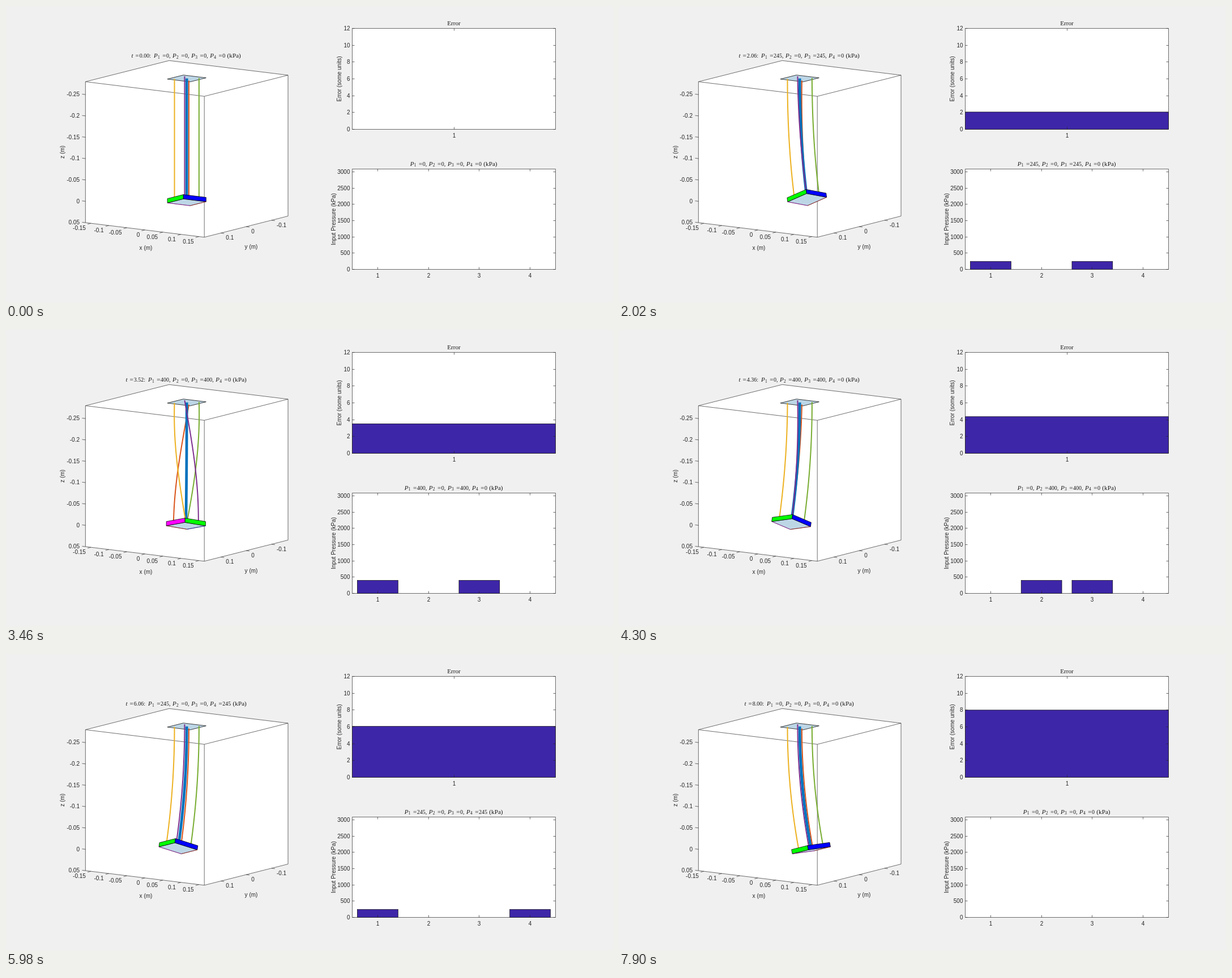
Write an HTML page that moves like this. It is 1072x522 px and loops after 8000 ms.

```html
<!DOCTYPE html>
<html lang="en">
<head>
<meta charset="utf-8">
<title>Soft arm simulation</title>
<style>
html, body { margin: 0; width: 100%; height: 100%; overflow: hidden; background: #f0f0f0; }
svg { display: block; width: 1072px; height: 522px; }
text { font: 10px "Liberation Sans", Arial, sans-serif; fill: #262626; }
.math, .math tspan { font-family: "Liberation Serif", "Times New Roman", serif; fill: #1a1a1a; }
.math { font-size: 10px; }
.word { font-size: 11.2px; }
.var { font-size: 11px; font-style: italic; }
.sub { font-size: 7.5px; }
.axis { fill: none; stroke: #262626; stroke-width: .67; }
.bar { fill: #3e26a8; stroke: #000; stroke-width: .67; }
.arm { fill: none; stroke-width: 2; }
.plate { fill: #bdd6e6; stroke: #000; stroke-width: .75; stroke-linejoin: round; }
</style>
</head>
<body>
<svg viewBox="0 0 1072 522">
  <g id="back"></g>
  <g id="bars"></g>
  <g id="axes"></g>
  <g id="scene"></g>
</svg>
<script>
const $ = id => document.getElementById(id);
const FRAMES = 66, END = 8, LOOP = 8000;
const PMAX = 400, LENGTH = 0.28, HALF = 0.0315, ARM = 0.02, THICK = 0.01;
const VIEW = [-0.557, -0.811, 0.18];

// Per 2 s phase: active muscles, and the bend x, bend y, twist, shortening they settle at
const PHASES = [
  { on: [2, 3], goal: [0.27, 0, 0, 0.0012] },
  { on: [0, 2], goal: [-0.016, 0, 1.69, 0.0012] },
  { on: [1, 2], goal: [0, -0.262, 0, 0.0012] },
  { on: [0, 3], goal: [0, 0.262, 0, 0.0012] }
];
const LAG = [0.3, 0.3, 0.2, 0.2];

const phaseAt = t => PHASES[Math.min(3, Math.floor(t / 2))];
const drive = t => Math.tanh(7.5 * Math.abs(Math.sin(Math.PI * t / 2)));

// First-order response, one state per millisecond
const states = [[0, 0, 0, 0]];
for (let ms = 0; ms < END * 1000; ms++) {
  const t = (ms + 0.5) / 1000, { goal } = phaseAt(t), d = drive(t);
  states.push(states[ms].map((q, k) => q + (goal[k] * d - q) * 0.001 / LAG[k]));
}

// ---- vectors and projection
const add = (a, b) => a.map((v, i) => v + b[i]);
const mul = (a, k) => a.map(v => v * k);
const dot = (a, b) => a[0] * b[0] + a[1] * b[1] + a[2] * b[2];
const cross = (a, b) => [
  a[1] * b[2] - a[2] * b[1], a[2] * b[0] - a[0] * b[2], a[0] * b[1] - a[1] * b[0]];
const project = ([x, y, z]) => [319.2 + 636 * x - 448 * y, 338.6 + 78 * x + 113 * y + 753 * z];
const points = list => list.map(p => project(p).map(v => v.toFixed(2)).join()).join(" ");

// Frame of the constant-strain backbone at s = 0 (top) to 1 (tip)
function backbone(q, s) {
  const w = mul(q.slice(0, 3), s), a = Math.hypot(...w), tiny = a < 1e-4;
  const A = tiny ? 1 : Math.sin(a) / a;
  const B = tiny ? 0.5 : (1 - Math.cos(a)) / (a * a);
  const C = tiny ? 1 / 6 : (a - Math.sin(a)) / (a * a * a);
  const series = (v, k1, k2) => {
    const c = cross(w, v);
    return add(add(v, mul(c, k1)), mul(cross(w, c), k2));
  };
  const turn = v => series(v, A, B);
  const pos = add([0, 0, -LENGTH], mul(series([0, 0, 1], B, C), (LENGTH - q[3]) * s));
  return { turn, at: v => add(pos, turn(v)) };
}

// ---- drawing helpers
const text = (x, y, s, anchor = "middle", extra = "") =>
  `<text x="${x}" y="${y}" text-anchor="${anchor}" ${extra}>${s}</text>`;
const path = d => `<path class="axis" d="${d}"/>`;
const poly = (list, extra) => `<polygon class="plate" points="${points(list)}" ${extra || ""}/>`;
const snap = v => Math.round(v - 0.5) + 0.5;
const square = (h, z) => [[-h, h, z], [-h, -h, z], [h, -h, z], [h, h, z]];

function title(cx, y, p, t) {
  const lead = t === undefined ? 0 : 39.5;
  const vals = p.map(v => v.toFixed(0));
  const digits = vals.join("").length;
  let x = cx - (lead + 4 * 22 + digits * 5 + 3 * 6.1 + 3.3 + 24.9) / 2, out = "";
  const put = (dx, s, cls = "", dy = 0) =>
    out += `<tspan class="${cls}" x="${(x + dx).toFixed(2)}" y="${y + dy}">${s}</tspan>`;
  if (lead) {
    put(0, "t", "var");
    put(7, "=", "word");
    put(14.2, t.toFixed(2) + ":");
    x += lead;
  }
  vals.forEach((v, i) => {
    put(0, "P", "var");
    put(7, i + 1, "sub", 1.5);
    put(15.2, "=", "word");
    put(22, v + (i < 3 ? "," : ""));
    x += 22 + 5 * v.length + (i < 3 ? 6.1 : 3.3);
  });
  put(0, "(kPa)", "word");
  return `<text class="math">${out}</text>`;
}

// ---- right-hand charts
const LEFT = 611.5, RIGHT = 970.5, MIDDLE = (LEFT + RIGHT) / 2, SLOT = (RIGHT - LEFT) / 4;
const errY = v => 217.5 - v * 14.83;
const presY = v => 464.5 - v * 0.05726;
const presX = n => LEFT + (n - 0.5) * SLOT;

function chart(top, bottom, yTicks, yPos, xTicks, xPos) {
  let d = `M${LEFT} ${top}H${RIGHT}V${bottom}H${LEFT}Z`, labels = "";
  for (const v of yTicks) {
    const y = snap(yPos(v));
    d += `M${LEFT} ${y}h4M${RIGHT} ${y}h-4`;
    labels += text(607.5, y + 3.8, v, "end");
  }
  for (const v of xTicks) {
    const x = snap(xPos(v));
    d += `M${x} ${top}v4M${x} ${bottom}v-4`;
    labels += text(x, bottom + 14.3, v);
  }
  return path(d) + labels;
}

function bar(x0, x1, y0, y1) {
  return `<rect class="bar" x="${x0}" y="${y1}" width="${x1 - x0}" height="${y0 - y1}"/>`;
}

// ---- fixed parts
const E = 0.165, TOP = -0.28, LOW = 0.05;
const hull = [[-E, E, TOP], [-E, -E, TOP], [E, -E, TOP], [E, -E, LOW], [E, E, LOW], [-E, E, LOW]];
const edge = (...list) => `<polyline class="axis" points="${points(list)}"/>`;

function axes3d() {
  let d = "", labels = "";
  const tick = (p, dx, dy) => {
    const [x, y] = project(p);
    d += `M${x.toFixed(2)} ${y.toFixed(2)}l${dx} ${dy}`;
    return [x, y];
  };
  for (let i = -3; i <= 3; i++) {
    const [x, y] = tick([i * 0.05, E, LOW], -5.8, 1.5);
    labels += text(x - 9, y + 12.2, i * 5 / 100, "end");
  }
  for (const v of [0.1, 0, -0.1]) {
    const [x, y] = tick([E, v, LOW], 5.9, 0.7);
    labels += text(x + 9, y + 11.7, v, "start");
  }
  for (let i = -5; i <= 1; i++) {
    const [, y] = tick([-E, E, i * 0.05], -5.9, -0.7);
    labels += text(130, y + 3.2, i * 5 / 100, "end");
  }
  return edge(...hull, hull[0]) + edge(hull[0], [E, E, TOP], hull[2]) +
    edge([E, E, TOP], hull[4]) + path(d) + labels;
}

const upright = (x, y, s) => text(0, 0, s, "middle", `transform="translate(${x} ${y}) rotate(-90)"`);

$("back").innerHTML =
  `<polygon fill="#fff" points="${points(hull)}"/>` +
  `<path fill="#fff" d="M${LEFT} 39.5H${RIGHT}v178H${LEFT}zM${LEFT} 287.5H${RIGHT}v177H${LEFT}z"/>` +
  axes3d();

$("axes").innerHTML =
  chart(39.5, 217.5, [0, 2, 4, 6, 8, 10, 12], errY, [1], () => MIDDLE) +
  chart(287.5, 464.5, [0, 500, 1000, 1500, 2000, 2500, 3000], presY, [1, 2, 3, 4], presX) +
  text(247, 430, "x (m)") + text(433, 427.5, "y (m)") + upright(103, 257.5, "z (m)") +
  upright(592, 128.5, "Error (some units)") + upright(581.5, 376, "Input Pressure (kPa)") +
  text(MIDDLE, 34, "Error", "middle", 'class="math word"');

// ---- moving parts
const MUSCLES = [
  [[ARM, ARM, 0], "#d95319"], [[ARM, -ARM, 0], "#77ac30"], [[-ARM, ARM, 0], "#edb120"],
  [[0, 0, 0], "#0072bd", 4.7], [[-ARM, -ARM, 0], "#7e2f8e"]
];
const SIDES = [
  ["#0f0", [-1, 0, 0]], ["#00f", [0, -1, 0]], ["#f00", [1, 0, 0]], ["#f0f", [0, 1, 0]]
];

function drawArm(q) {
  const STEPS = 28;
  const spine = Array.from({ length: STEPS + 1 }, (_, i) => backbone(q, i / STEPS));
  const mid = spine[STEPS / 2], tip = spine[STEPS];
  let out = poly(square(HALF, -LENGTH));

  MUSCLES.map(([v, color, width]) => ({ v, color, width, depth: dot(mid.turn(v), VIEW) }))
    .sort((a, b) => a.depth - b.depth)
    .forEach(({ v, color, width }) => {
      out += `<polyline class="arm" stroke="${color}" points="${points(spine.map(f => f.at(v)))}"` +
        (width ? ` style="stroke-width:${width}"` : "") + "/>";
    });

  const upper = square(HALF, 0).map(tip.at), lower = square(HALF, THICK).map(tip.at);
  if (dot(tip.turn([0, 0, 1]), VIEW) > 0) out += poly(lower);
  SIDES.forEach(([color, normal], i) => {
    const j = (i + 1) % 4;
    if (dot(tip.turn(normal), VIEW) > 0)
      out += poly([upper[i], upper[j], lower[j], lower[i]], `style="fill:${color}"`);
    else
      out += `<polyline class="arm" style="stroke-width:1" stroke="${color}" opacity=".4" ` +
        `points="${points([lower[i], lower[j]])}"/>`;
  });
  return out;
}

function render(i) {
  const t = i * END / FRAMES;
  const p = [0, 0, 0, 0];
  phaseAt(t).on.forEach(k => p[k] = PMAX * drive(t));

  let bars = t > 0 ? bar(LEFT, RIGHT, 217.5, errY(t)) : "";
  p.forEach((v, k) => {
    const x = presX(k + 1);
    if (v > 1) bars += bar(x - 0.4 * SLOT, x + 0.4 * SLOT, 464.5, presY(v));
  });
  $("bars").innerHTML = bars;
  $("scene").innerHTML = drawArm(states[Math.round(t * 1000)]) +
    title(318.5, 91, p, t) + title(MIDDLE, 281.5, p);
}

let shown = -1;
function tick() {
  const ms = performance.now() % LOOP;
  const i = ms < 100 ? 0 : Math.min(FRAMES, 1 + Math.floor((ms - 100) / 120));
  if (i !== shown) render(shown = i);
  requestAnimationFrame(tick);
}
tick();
</script>
</body>
</html>
```
